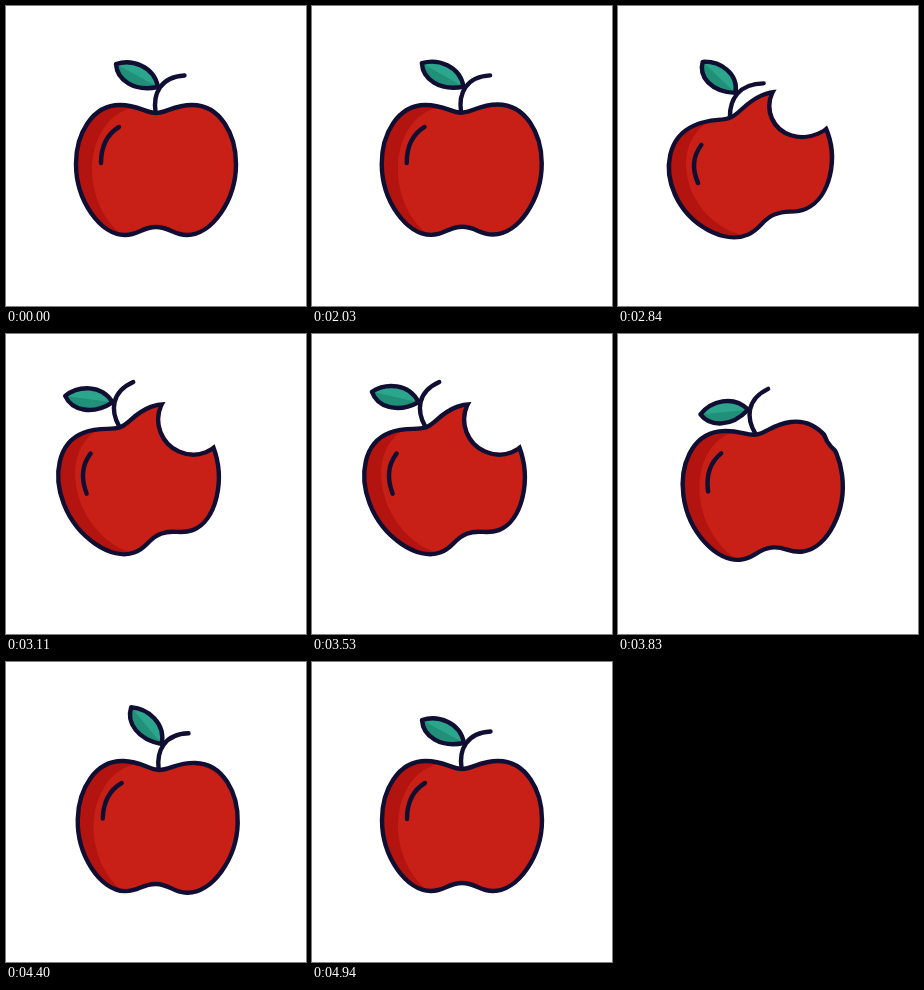
An HTML page with a canvas for the animation above (5.03 s loop, 300 by 300 pixels).

```html
<!DOCTYPE html>
<html lang="en">
<head>
<meta charset="utf-8">
<title>Apple</title>
<style>
html, body { margin: 0; width: 100%; height: 100%; overflow: hidden; background: #fff; }
canvas { display: block; width: 300px; height: 300px; }
</style>
</head>
<body>
<canvas id="stage" width="300" height="300"></canvas>
<script>
const ctx = document.getElementById('stage').getContext('2d');
const LOOP = 5030;
const LINE = 4.4;

const body = new Path2D(`M150 107 C160 107 168 99 186 99 C214 99 230 128 230 158
  C230 194 206 229 181 229 C167 229 164 221 150 221 C136 221 133 229 119 229
  C94 229 70 194 70 158 C70 128 86 99 114 99 C132 99 140 107 150 107Z`);
const shade = new Path2D('M60 90 H130 V101 C100 106 86 135 86 165 C87 198 104 222 120 231 H60Z');
const shine = new Path2D('M113 121 Q95 132 95 157');
const stem = new Path2D('M149.5 106 C147 88 154 71 178.5 69.5');
const leaf = new Path2D('M110 58 C126 53 148 60 152 81 C128 86 111 74 110 58Z');
const leafShade = new Path2D('M110 58 L152 81 C128 86 111 74 110 58Z');

const rest = { x: 150, y: 164, tilt: 0 };
const lean = { x: 134.5, y: 146.5, tilt: -21 };
const over = { x: 157.2, y: 168.4, tilt: 6.7 };

const progress = (t, from, to) => Math.min(1, Math.max(0, (t - from) / (to - from)));
const ease = (t, from, to) => (1 - Math.cos(Math.PI * progress(t, from, to))) / 2;
const bump = (t, from, to) => Math.sin(Math.PI * progress(t, from, to)) ** 2;

function bodyPose(t) {
  const toLean = ease(t, 2000, 2400);
  const toOver = ease(t, 3620, 4050);
  const toRest = ease(t, 4050, 4560);
  const blend = key => rest[key] + (lean[key] - rest[key]) * toLean
    + (over[key] - lean[key]) * toOver + (rest[key] - over[key]) * toRest;
  return { x: blend('x'), y: blend('y'), tilt: blend('tilt') };
}

// The stem trails the body, and the leaf trails the stem.
function stemSwing(t) {
  return 25 * bump(t, 2000, 2680) + 29 * bump(t, 2560, 3100)
    - 16 * bump(t, 3600, 4000) + 13 * bump(t, 3850, 4400) - 3 * bump(t, 4500, 4940);
}

function leafSwing(t) {
  return 28 * bump(t, 2000, 2680) + 12 * bump(t, 2560, 3100) + 5 * bump(t, 3250, 3820)
    - 12 * bump(t, 3640, 4060) + 24 * bump(t, 4060, 4600) - 4 * bump(t, 4560, 4940);
}

function turn(degrees, x, y) {
  ctx.translate(x, y);
  ctx.rotate(degrees * Math.PI / 180);
  ctx.translate(-x, -y);
}

function fill(path, color) {
  ctx.fillStyle = color;
  ctx.fill(path);
}

function drawBody() {
  fill(body, '#c82016');
  ctx.save();
  ctx.clip(body);
  fill(shade, '#b3140f');
  ctx.restore();
  ctx.stroke(body);
  ctx.stroke(shine);
}

// A circle slides in from the upper right and cuts the body.
function drawBite(depth) {
  const circle = radius => {
    const away = 42 * (1 - depth);
    ctx.beginPath();
    ctx.arc(221 + away * 0.88, 126 - away * 0.47, radius, 0, Math.PI * 2);
  };
  ctx.globalCompositeOperation = 'source-atop';
  circle(35);
  ctx.stroke();
  ctx.globalCompositeOperation = 'destination-out';
  circle(35 - LINE / 2);
  ctx.fill();
  ctx.globalCompositeOperation = 'source-over';
}

function draw(t) {
  const { x, y, tilt } = bodyPose(t);
  const dip = bump(t, 2580, 3100);
  const bite = ease(t, 2480, 2570) - ease(t, 3640, 3900);

  ctx.clearRect(0, 0, 300, 300);
  ctx.save();
  ctx.strokeStyle = '#100e32';
  ctx.lineWidth = LINE;
  ctx.lineCap = ctx.lineJoin = 'round';

  ctx.translate(x, y + 13.5 * dip);
  ctx.rotate((tilt - 3 * dip) * Math.PI / 180);
  ctx.scale(1 + 0.03 * dip, 1 - 0.065 * dip);
  ctx.translate(-150, -164);
  drawBody();
  if (bite > 0) drawBite(bite);

  turn(stemSwing(t), 149.5, 106);
  ctx.stroke(stem);

  turn(leafSwing(t), 152, 81);
  fill(leaf, '#2ca58d');
  fill(leafShade, '#219079');
  ctx.stroke(leaf);
  ctx.restore();
}

const start = performance.now();
function tick() {
  draw((performance.now() - start) % LOOP);
  requestAnimationFrame(tick);
}
tick();
</script>
</body>
</html>
```
